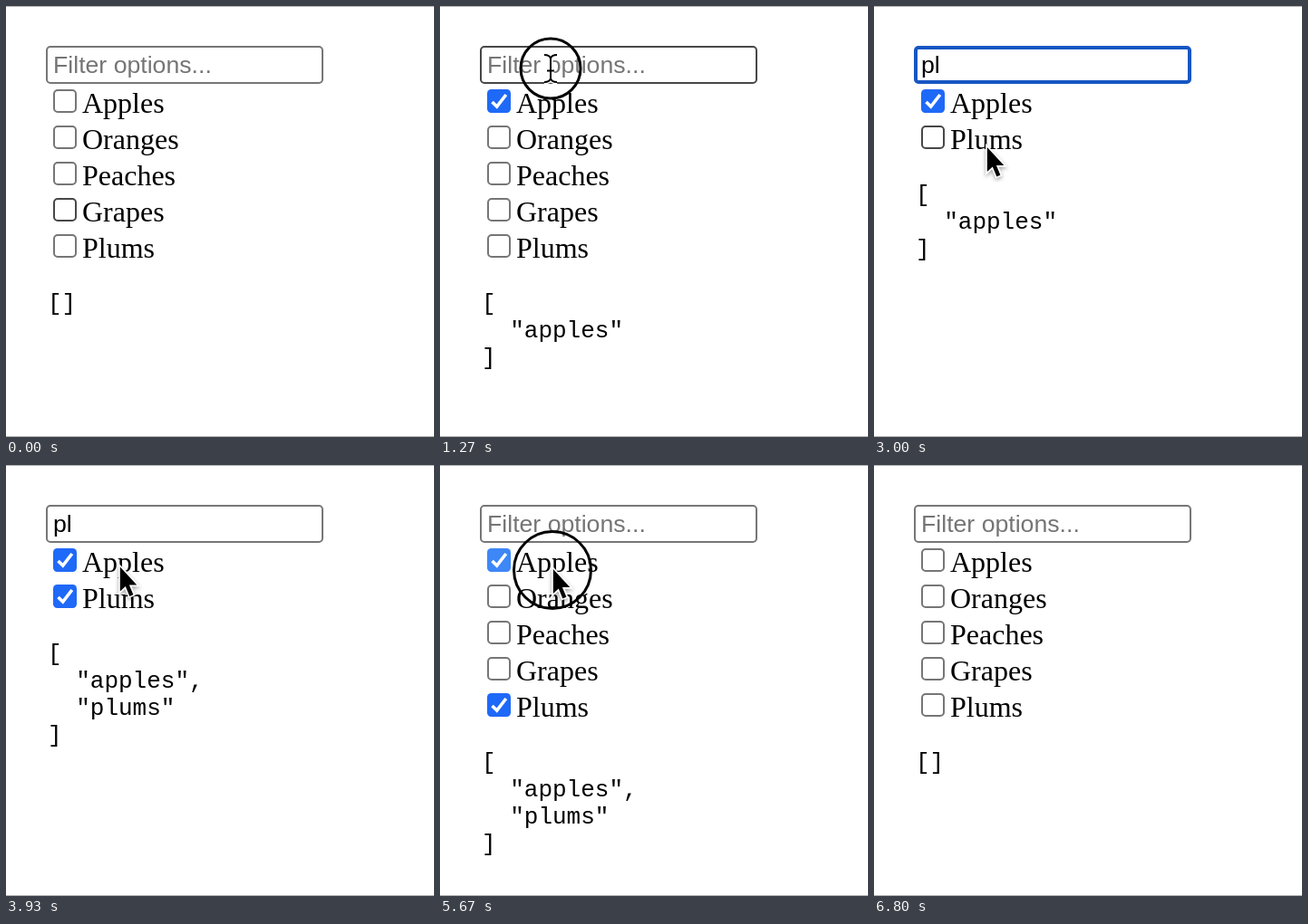
These frames come from a looping animation (472 by 476 pixels, 7270 ms). An HTML page:

```html
<!DOCTYPE html>
<html lang="en">
<head>
<meta charset="utf-8">
<title>Filterable checkbox list</title>
<style>
  html, body { margin: 0; width: 100%; height: 100%; overflow: hidden; background: #fff; }
  svg { display: block; width: 100%; height: 100%; }
  text { white-space: pre; }
  .field { font: 26.67px "Liberation Sans", Arial, sans-serif; }
  .label { font: 32px "Liberation Serif", "Times New Roman", serif; }
  .code { font: 26px "Liberation Mono", "Courier New", monospace; }
  #arrow { filter: drop-shadow(0 2px 2px rgba(0, 0, 0, .35)); }
</style>
</head>
<body>
<svg viewBox="0 0 472 476">
  <rect width="472" height="476" fill="#fff"/>
  <path d="M0 .5H472M0 475.5H472" stroke="#b4b4b4"/>
  <rect id="box" fill="#fff"/>
  <rect id="selection" x="52" y="50" width="20.5" height="30" fill="#accef7"/>
  <text id="value" class="field" x="52" y="74"></text>
  <rect id="caret" y="50.5" width="2" height="29"/>
  <g id="list"></g>
  <g id="output"></g>
  <g id="pointer">
    <circle id="ring" fill="none" stroke="#000" stroke-width="3"/>
    <path id="arrow" d="M.8 1V28L6.8 22.4L11.3 33.4L15.4 31.7L10.9 21H19.3Z"
      stroke="#fff" stroke-width="3.4" paint-order="stroke"/>
    <g id="beam" fill="none">
      <path id="beamEdge" stroke="#fff" stroke-width="5"/>
      <path id="beamLine" stroke="#000" stroke-width="2"/>
    </g>
  </g>
</svg>
<script>
const LOOP = 7270, FPS = 15;
const FRUITS = ["Apples", "Oranges", "Peaches", "Grapes", "Plums"];
const BORDER = "#767676", HOVER = "#474747";
const $ = id => document.getElementById(id);

// Pointer path: [tick, x, y]
const PATH = [
  [0, 480, 222], [1, 402, 215], [5, 124, 99], [15, 124, 99], [19, 122, 69],
  [37, 122, 69], [41, 124, 160], [43, 124, 160], [45, 124, 155], [57, 124, 155],
  [61, 126, 68], [77, 126, 68], [80, 126, 230], [82, 124, 114], [87, 124, 114],
  [92, 124, 249], [94, 124, 253], [99, 124, 253], [101, 270, 270]
];
// Ranges of ticks, end exclusive
const SHOWN = [[1, 30], [38, 73], [78, 102]];
const PRESSED = [[6, 8], [19, 20], [46, 47], [62, 63], [65, 66], [85, 86], [95, 97]];
const FOCUSED = [[20, 46], [63, 85]];
const SELECTED = [[66, 73]];
const CHECKED = { Apples: [[8, 86]], Plums: [[47, 97]] };
const TYPED = [[0, ""], [30, "p"], [32, "pl"], [73, ""]];
const CARET_RESETS = [20, 30, 32, 63, 73];

const within = (ranges, n) => ranges.some(([a, b]) => n >= a && n < b);
const show = (id, on) => $(id).setAttribute("visibility", on ? "visible" : "hidden");
const attrs = (id, map) => {
  for (const k in map) $(id).setAttribute(k, map[k]);
};

function pointerAt(n) {
  const i = PATH.findIndex(p => p[0] > n);
  if (i < 0) return PATH[PATH.length - 1].slice(1);
  const a = PATH[i - 1], b = PATH[i];
  const u = (n - a[0]) / (b[0] - a[0]);
  const e = u * u * (3 - 2 * u);
  return [a[1] + (b[1] - a[1]) * e, a[2] + (b[2] - a[2]) * e];
}

function option(name, row, checked, hover, pressed) {
  const y = 40 * row;
  const blue = hover && pressed ? "#3d87f7" : "#1f69f8";
  const mark = checked
    ? `<rect x="52" y="${y + 92}" width="26" height="26" rx="4.5" fill="${blue}"/>
       <path d="M57.5 ${y + 106}l5.2 5L72.8 ${y + 98}" fill="none" stroke="#fff" stroke-width="3.6"/>`
    : `<rect x="53" y="${y + 93}" width="24" height="24" rx="4" fill="#fff"
       stroke="${hover ? HOVER : BORDER}" stroke-width="2"/>`;
  return `${mark}<text class="label" x="84" y="${y + 118}">${name}</text>`;
}

function drawInput(n, text, focused, hover) {
  const w = focused ? 4 : 2;
  attrs("box", {
    x: 44 + w / 2, y: 44 + w / 2, width: 306 - w, height: 42 - w, rx: focused ? 3 : 4,
    stroke: focused ? "#1656c3" : hover ? HOVER : BORDER, "stroke-width": w
  });
  const value = $("value");
  value.textContent = text || "Filter options...";
  value.setAttribute("fill", text ? "#000" : "#757575");
  const selected = within(SELECTED, n);
  show("selection", selected);
  const reset = CARET_RESETS.filter(r => r <= n).pop() || 0;
  show("caret", focused && !selected && (n - reset) % 15 < 7);
  $("caret").setAttribute("x", text ? 51.3 + value.getComputedTextLength() : 52);
}

function drawOutput(top, chosen) {
  const lines = chosen.length
    ? ["[", ...chosen.map((c, i) => `  "${c.toLowerCase()}"${i < chosen.length - 1 ? "," : ""}`), "]"]
    : ["[]"];
  $("output").innerHTML = lines.map((s, i) =>
    `<text class="code" x="46" y="${top + 30 * i}">${s}</text>`).join("");
}

function drawPointer(n, x, y, pressed) {
  const beam = y < 87;
  const shown = within(SHOWN, n);
  attrs("pointer", { transform: `translate(${x} ${y})` });
  show("arrow", shown && !beam);
  show("beam", shown && beam);
  show("ring", shown && pressed);
  attrs("ring", { r: beam ? 33 : 42.5, cy: beam ? 0 : 2 });
}

function draw(time) {
  const n = Math.floor((time % LOOP + 3.4) * FPS / 1000);
  const [x, y] = pointerAt(n);
  const text = TYPED.filter(e => e[0] <= n).pop()[1];
  const pressed = within(PRESSED, n);
  const active = n < 102;
  const isChecked = f => within(CHECKED[f] || [], n);
  const visible = FRUITS.filter(f => f.toLowerCase().includes(text));

  drawInput(n, text, within(FOCUSED, n), active && y > 44 && y < 87);
  $("list").innerHTML = visible.map((f, i) =>
    option(f, i, isChecked(f), active && Math.floor((y - 88) / 40) === i, pressed)).join("");
  drawOutput(136 + 40 * visible.length, FRUITS.filter(isChecked));
  drawPointer(n, x, y, pressed);
}

const beamShape = "M-7-15Q-1-15 0-11Q1-15 7-15M0-11V11M-7 15Q-1 15 0 11Q1 15 7 15M-4 2.5H4";
attrs("beamEdge", { d: beamShape });
attrs("beamLine", { d: beamShape });

let start;
function tick(now) {
  if (start === undefined) start = now;
  draw(now - start);
  requestAnimationFrame(tick);
}
draw(0);
requestAnimationFrame(tick);
</script>
</body>
</html>
```
